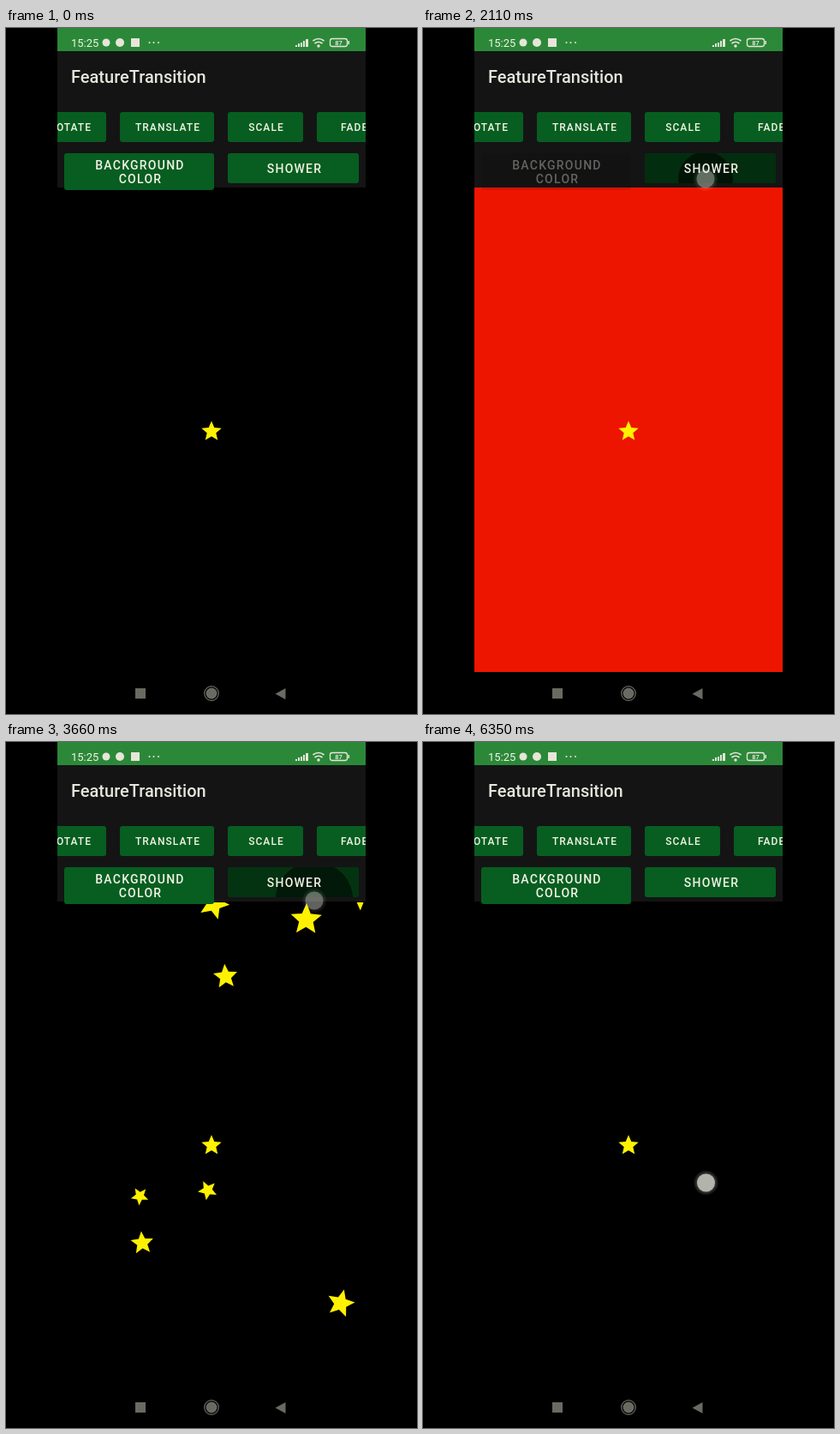
Recreate the animation shown at these times as an HTML page. Size 480x800 px, loop 6.39 s.

```html
<!DOCTYPE html>
<html lang="en">
<head>
<meta charset="utf-8">
<title>Star shower</title>
<style>
  html, body { margin: 0; width: 100%; height: 100%; overflow: hidden; background: #000; }
  svg { display: block; width: 480px; height: 800px; }
  text { font-family: Roboto, sans-serif; fill: #f2f2e6; }
  .label { font-weight: 500; }
  .small { font-size: 12px; letter-spacing: 1.07px; }
  .large { font-size: 14px; letter-spacing: 1.25px; }
</style>
</head>
<body>
<svg id="stage" viewBox="0 0 480 800">
  <defs>
    <path id="star" d="M0 5.27 6.18 9 4.54 1.97 10-2.76 2.81-3.37 0-10-2.81-3.37-10-2.76-4.54 1.97-6.18 9Z" fill="#fff200"/>
    <clipPath id="screen"><rect x="60" width="360" height="800"/></clipPath>
    <clipPath id="field"><rect x="60" y="187" width="360" height="565"/></clipPath>
    <radialGradient id="glow">
      <stop offset=".68" stop-color="#fff" stop-opacity=".35"/>
      <stop offset="1" stop-color="#fff" stop-opacity="0"/>
    </radialGradient>
  </defs>
  <rect width="480" height="800"/>
  <g clip-path="url(#screen)">
    <rect x="60" y="27" width="360" height="161" fill="#141415"/>
    <rect x="60" width="360" height="27" fill="#2c8839"/>
    <g fill="#e6e6d8">
      <text x="76" y="22" font-size="13">15:25</text>
      <circle cx="117" cy="17" r="4.5"/>
      <circle cx="133" cy="17" r="5"/>
      <rect x="146" y="12" width="10" height="10"/>
      <circle cx="167.500" cy="17" r="1"/><circle cx="172.500" cy="17" r="1"/><circle cx="178" cy="17" r="1"/>
      <path d="M338 22v-2h2v2zm3 0v-4h2v4zm3 0v-5h2v5zm3 0v-7h2v7zm3 0v-9h3v9z"/>
      <circle cx="365" cy="21" r="1.700"/>
      <path d="M358.500 15q6.500-5 13 0M360.500 18q4.500-3.500 9 0" fill="none" stroke="#e6e6d8" stroke-width="1.700"/>
      <rect x="378.500" y="12.500" width="20" height="9" rx="2.500" fill="none" stroke="#e6e6d8" stroke-width="1.300"/>
      <rect x="399.500" y="15" width="1.500" height="4"/>
      <text x="388.500" y="20" font-size="7.500" font-weight="500" text-anchor="middle">87</text>
    </g>
    <text x="76" y="64" font-size="20" font-weight="500" style="fill:#e6e6dc">FeatureTransition</text>
    <rect id="backdrop" x="60" y="186" width="360" height="565"/>
    <g id="shower" clip-path="url(#field)"></g>
    <use id="hero" href="#star"/>
    <g id="buttons"></g>
    <g fill="#6a6a62">
      <rect x="151" y="770" width="12" height="12"/>
      <circle cx="240" cy="776" r="6.500"/>
      <circle cx="240" cy="776" r="8.300" fill="none" stroke="#6a6a62" stroke-width="1.200"/>
      <path d="M314.500 776.500 326.500 770v13z"/>
    </g>
    <g id="touches"></g>
  </g>
</svg>
<script>
const LOOP = 6390, PRESS = 70, UNIT = 1.17, VIEW = 28;
const FIELD = { top: 187, height: 564 };
const $ = id => document.getElementById(id);

function add(parent, tag, attrs, text) {
  const el = document.createElementNS('http://www.w3.org/2000/svg', tag);
  for (const key in attrs) el.setAttribute(key, attrs[key]);
  if (text) el.textContent = text;
  parent.append(el);
  return el;
}
const show = (el, on) => el.setAttribute('display', on ? 'inline' : 'none');
const clamp = v => Math.min(1, Math.max(0, v));
const ease = v => (1 - Math.cos(Math.PI * clamp(v))) / 2;

// Out and back again, each leg lasting `leg` ms
function pingPong(time, start, leg) {
  const p = (time - start) / leg;
  return p < 0 || p > 2 ? 0 : ease(p < 1 ? p : 2 - p);
}

// box: x, y, width, height; lines: text, x, baseline; busy: disabled from / for
const buttons = {
  rotate: { box: [30, 98, 87, 35], size: 'small', anchor: 'end', lines: [['ROTATE', 100, 120]], busy: [756, 1000], touch: [85, 114] },
  translate: { box: [133, 98, 110, 35], size: 'small', lines: [['TRANSLATE', 189, 120]], busy: [932, 600], touch: [188, 114] },
  scale: { box: [259, 98, 88, 35], size: 'small', lines: [['SCALE', 304, 120]], busy: [1107, 600], touch: [303, 114] },
  fade: { box: [363, 98, 90, 35], size: 'small', anchor: 'start', lines: [['FADE', 391, 120]], busy: [1315, 600], touch: [400.500, 113.500] },
  color: { box: [68, 146, 175, 43], size: 'large', lines: [['BACKGROUND', 156.500, 165], ['COLOR', 157, 181]], busy: [1733, 1000], touch: [156, 168] },
  shower: { box: [259, 146, 153, 35], size: 'large', lines: [['SHOWER', 337, 169]] }
};

// x, scale, start, duration, total spin
const stars = [
  [391, 1.36, 1934, 1972, 16],
  [147, 1.65, 2290, 1180, 335],
  [395, .65, 2470, 909, 372],
  [412, 1.2, 2590, 700, 316],
  [159, 1.13, 2750, 1121, 437],
  [156, .87, 2850, 1069, 433],
  [257, 1.2, 2947, 1743, 165],
  [235, .95, 3090, 760, 347],
  [350, 1.55, 3251, 1476, 783],
  [243, 1.5, 3275, 1822, 96],
  [414, 1.3, 3416, 1587, 227],
  [150, .75, 3630, 750, 40],
  [310, 1.4, 3790, 974, 330],
  [214.500, 1.57, 3900, 925, 260],
  [77, .38, 4115, 1195, 282]
].map(([x, scale, start, duration, spin]) => ({
  x, scale, start, duration, spin, el: add($('shower'), 'use', { href: '#star' })
}));

const taps = [];
function addTap(button, press, [x, y]) {
  const ripple = button && add(button.ripples, 'circle', { cx: x, cy: y });
  const dot = add($('touches'), 'g', { transform: `translate(${x} ${y})` });
  add(dot, 'circle', { r: 15, fill: 'url(#glow)' });
  add(dot, 'circle', { r: 10.5, fill: '#fffff6' });
  taps.push({ press, ripple, dot });
}

for (const [name, b] of Object.entries(buttons)) {
  const [x, y, width, height] = b.box;
  const shape = { x, y, width, height, rx: 3 };
  const group = add($('buttons'), 'g', {});
  add(add(group, 'clipPath', { id: 'edge-' + name }), 'rect', shape);
  b.face = add(group, 'rect', { ...shape, fill: '#075e20' });
  b.ripples = add(group, 'g', { 'clip-path': `url(#edge-${name})` });
  b.labels = add(group, 'g', { class: 'label ' + b.size, 'text-anchor': b.anchor || 'middle' });
  for (const [text, tx, ty] of b.lines) add(b.labels, 'text', { x: tx, y: ty }, text);
  if (b.busy) addTap(b, b.busy[0] - PRESS, b.touch);
}
for (const start of [...stars.map(s => s.start), 2110])
  addTap(buttons.shower, start - PRESS, start < 3000 ? [330, 176] : [360, 185]);
addTap(null, 6350, [330.500, 514]);

function drawStar(s, time) {
  const p = (time - s.start) / s.duration;
  show(s.el, p >= 0 && p < 1);
  const size = VIEW * s.scale;
  const y = FIELD.top + VIEW / 2 - size + p * p * (FIELD.height + 2 * size);
  s.el.setAttribute('transform', `translate(${s.x} ${y}) rotate(${p * s.spin}) scale(${s.scale * UNIT})`);
}

function drawTap(tap, time) {
  const age = time - tap.press;
  show(tap.dot, age >= 0 && age < 180);
  tap.dot.setAttribute('opacity', age < PRESS ? .7 : .38);
  if (!tap.ripple) return;
  show(tap.ripple, age >= 0 && age < 500);
  tap.ripple.setAttribute('r', Math.max(0, age * .45));
  tap.ripple.setAttribute('opacity', .52 * clamp((500 - age) / 250));
}

function draw(time) {
  const startOf = name => buttons[name].busy[0];
  const x = 240 + 66.7 * pingPong(time, startOf('translate'), 300);
  const turn = 360 * ease((time - startOf('rotate')) / 1000);
  const zoom = UNIT * (1 + 3 * pingPong(time, startOf('scale'), 300));
  $('hero').setAttribute('transform', `translate(${x} 470) rotate(${turn}) scale(${zoom})`);
  $('hero').setAttribute('opacity', 1 - pingPong(time, startOf('fade'), 300));

  // Colours blend in linear light
  const red = pingPong(time, startOf('color'), 500) ** (1 / 2.2);
  $('backdrop').setAttribute('fill', `rgb(${255 * red}, ${24 * red * red}, 0)`);

  for (const b of Object.values(buttons)) {
    const busy = b.busy && time >= b.busy[0] && time < b.busy[0] + b.busy[1];
    show(b.face, !busy);
    b.labels.setAttribute('opacity', busy ? .36 : 1);
  }
  stars.forEach(s => drawStar(s, time));
  taps.forEach(tap => drawTap(tap, time));
}

const origin = performance.now();
function tick() {
  draw((performance.now() - origin) % LOOP);
  requestAnimationFrame(tick);
}
tick();
</script>
</body>
</html>
```
